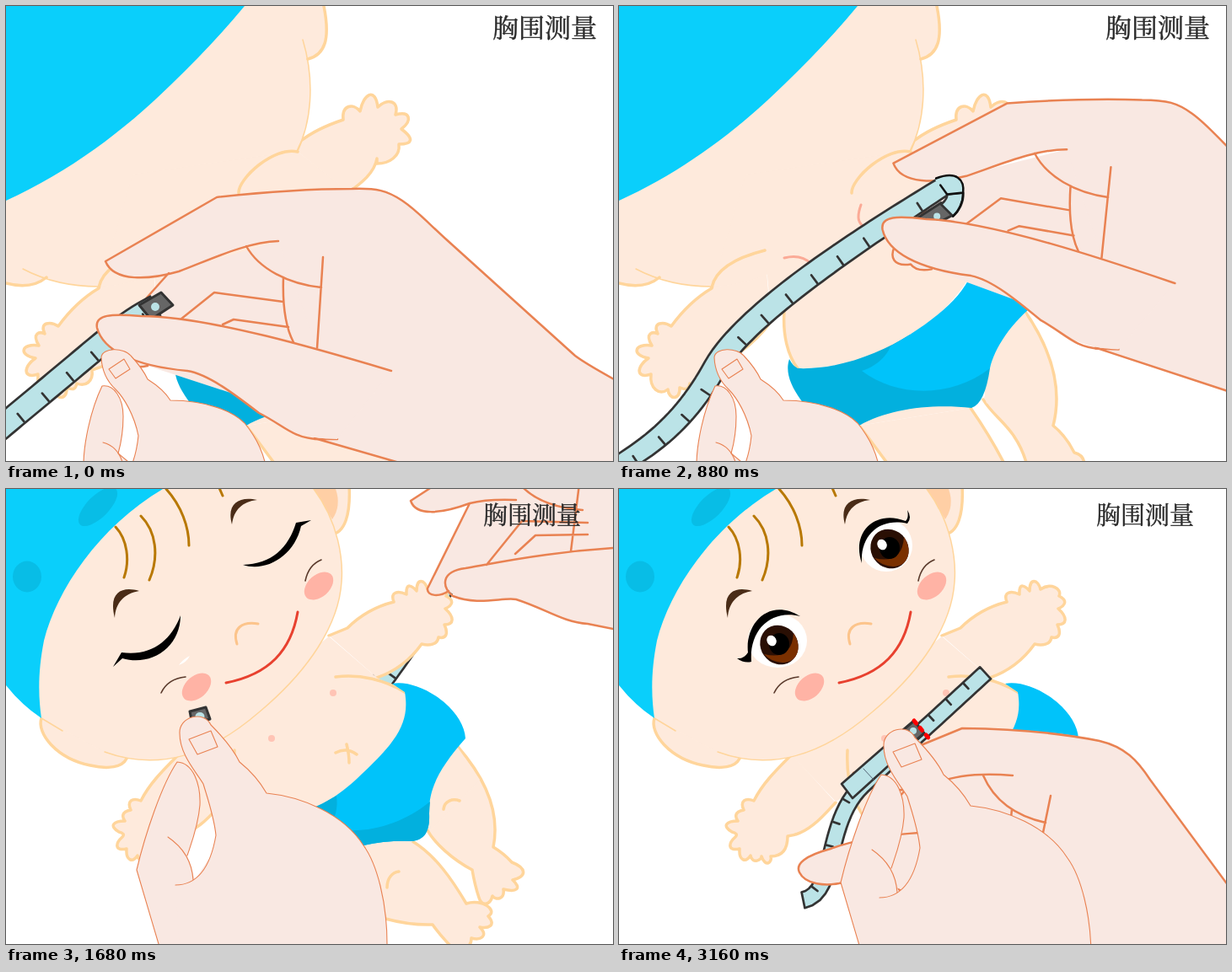
These frames come from a looping animation (720 by 540 pixels, 4920 ms). An HTML page:

```html
<!DOCTYPE html>
<html lang="zh">
<head>
<meta charset="utf-8">
<style>
html, body { margin: 0; width: 100%; height: 100%; overflow: hidden; background: #fff; }
svg { display: block; width: 720px; height: 540px; }
path, ellipse { stroke-linecap: round; stroke-linejoin: round; }
.skin { fill: #feeadc; }
.edge { fill: none; stroke: #ffd59b; stroke-width: 3.5; }
.limb { fill: #feeadc; stroke: #ffd59b; stroke-width: 3.5; }
.thin { stroke-width: 1.5; }
.palm { fill: #f9e8e2; }
.line { fill: none; stroke: #e98252; stroke-width: 2.5; }
.left { fill: #f9e8e2; stroke: #e98252; stroke-width: 1.1; }
.left .n { fill: none; }
.cap { fill: #0acffb; }
.dark { fill: #02b0de; }
.pants { fill: #00c3fa; }
.strip, .tape path { fill: #bbe3e7; stroke: #333; stroke-width: 2.7; }
.tape path.rail { fill: none; stroke: none; }
.block { fill: #666; stroke: #333; stroke-width: 3; }
text { font-family: "Noto Serif CJK SC", "Noto Sans CJK SC", serif; fill: #2b2b2b; stroke: #2b2b2b; stroke-width: .4; }
</style>
</head>
<body>
<svg viewBox="0 0 720 540">
<g id="back">
  <path class="limb" d="M180 375C160 402 130 424 102 432C104 446 94 452 84 448C82 458 76 454 72 453C73 468 59 468 58 455C48 463 36 454 38 437C20 443 20 428 35 418C14 414 18 400 39 403C30 388 40 386 46 389C39 375 53 374 62 380C78 358 93 345 110 335C115 310 145 297 173 290"/>
  <path class="limb" d="M345 172L350 160C365 148 385 140 400 135C398 117 412 115 420 125C424 104 438 96 441 120C452 109 467 112 462 129C480 124 482 136 469 146C485 158 482 164 466 164C468 178 455 187 440 187L440 181C437 198 422 210 405 222"/>
  <path class="limb" d="M285 498L320 545H458Q440 510 417 477"/>
  <path class="limb" d="M432 467C445 490 472 500 484 545H552Q552 533 540 530Q530 510 515 498C526 455 515 410 480 360"/>
  <path class="skin" d="M285 498L417 477L380 440H300ZM480 360L492 390L436 472L420 380Z"/>
  <path class="skin" d="M0 0H377C385 40 378 58 358 63C366 110 358 145 345 172C300 250 200 330 110 333Q60 330 48 322Q30 336 0 330Z"/>
  <path class="skin" d="M110 335Q120 300 173 290L181 373L196 362C194 390 200 415 212 430C350 430 420 330 430 290L405 220L345 172L150 200Z"/>
  <path class="edge" d="M377 0C385 40 378 58 358 63M0 329Q30 337 48 322M276 222C275 205 318 166 346 173M110 334C115 310 145 297 173 290M196 362C194 390 200 415 212 430"/>
  <path class="edge thin" d="M352 40C367 90 362 140 345 172M20 312Q60 333 110 333"/>
  <path class="cap" d="M0 0H283Q245 46 195 94C140 148 75 197 0 231Z"/>
  <path d="M196 299Q216 294 228 306M287 236C282 250 283 258 292 263" fill="none" stroke="#fbaa96" stroke-width="3"/>
  <path class="dark" d="M202 419Q206 427 212 430C260 432 310 412 345 390L440 430Q434 472 418 477C370 472 320 478 285 498C250 478 222 478 216 468C203 450 197 434 202 419Z"/>
  <path class="pants" d="M322 404C318 415 305 428 288 433C330 465 395 465 440 430C445 407 465 375 496 352C495 330 485 312 468 298L425 293C420 330 395 358 345 390Z"/>
  <g id="palm1">
    <path class="palm" d="M193 317L168 345L123 402C118 414 122 426 143 422Q150 431 168 427L300 470L400 410L323 279Z"/>
    <path class="palm" d="M118 303L250 227Q340 217 440 217C472 222 495 253 520 275L675 415Q700 434 830 500V720L634 606Q590 585 574 573L366 513L290 470L369 406L323 279C285 280 240 302 205 315C170 325 130 327 118 303Z"/>
    <path class="line" d="M323 279C285 280 240 302 205 315C170 325 128 328 118 303L250 227Q340 217 410 217C440 216 452 219 470 231C488 243 500 257 520 275L675 415Q700 434 830 500M285 285C300 312 335 330 374 334M376 298L369 406M329 322C328 350 331 380 341 399M193 317L168 345L123 402C118 414 122 426 143 422Q150 431 168 427M207 372L247 340L329 351M257 378L270 372L335 381M366 514H393M366 513L574 573Q590 585 634 606"/>
  </g>
  <g id="tape1" class="tape"></g>
  <g id="tip1">
    <path class="block" d="M158 355L184 340L198 355L172 372Z"/>
    <ellipse cx="177" cy="357" rx="5" ry="5" fill="#bbe3e7"/>
  </g>
  <g id="fold1">
    <path class="block" d="M416 234L444 216L459 230L440 240Z"/>
    <ellipse cx="439" cy="232" rx="4" ry="4" fill="#bbe3e7"/>
    <path class="strip" d="M470 204C471 215 465 226 458 232L444 218Q452 211 451 206Z"/>
    <path fill="#bbe3e7" d="M437 189L441 186C462 177 472 190 470 204L448 206Z"/>
    <path d="M438 187C462 178 472 188 470 205C470 215 465 226 458 232M470 204L451 206L443 195" fill="none" stroke="#111" stroke-width="2.5"/>
  </g>
  <g id="finger1">
    <path class="palm" d="M457 433C380 408 240 368 160 368C125 365 105 366 108 382C115 408 150 427 215 433C240 437 270 460 300 483C330 498 340 513 393 514Z"/>
    <path class="line" d="M457 433C380 410 240 368 160 368C125 365 105 366 108 382C115 408 150 427 215 433C240 437 270 460 300 483C330 498 340 513 370 514"/>
  </g>
  <g class="left">
    <path d="M92 545C92 520 100 480 114 451C128 449 139 465 139 487Q139 510 133 531L150 545Z"/>
    <path d="M113 417C114 405 140 405 148 415Q162 430 168 443Q187 455 195 468C240 468 270 482 283 495Q302 518 308 545H149Q155 530 157 510C152 485 140 465 130 455Q114 440 113 417Z"/>
    <path class="n" d="M122 431L140 419L147 431L130 442ZM115 518Q134 523 139 545"/>
  </g>
  <text x="577" y="37" font-size="31">胸围测量</text>
</g>

<g id="front">
  <g id="tapeA" class="tape"></g>
  <path class="limb" d="M383 174L405 165C422 148 440 139 460 134C455 121 466 121 475 125C474 110 482 115 487 121C487 105 497 107 500 119C512 111 526 118 522 127C532 132 530 138 521 142C532 152 532 161 520 161C525 172 522 178 513 176C512 185 502 186 493 184C478 205 460 217 440 224"/>
  <path class="limb" d="M205 315C185 335 170 350 160 370C150 366 143 370 148 381C136 383 138 390 141 394C127 394 122 400 134 407Q142 409 138 413C130 420 128 430 143 427C142 441 150 444 156 435C158 446 170 440 169 436C174 450 182 443 180 436C196 436 200 425 200 412C225 410 245 385 257 372"/>
  <path class="limb" d="M536 306C570 345 586 385 578 425Q590 432 600 443C618 450 618 460 601 464C612 474 606 479 590 475C592 488 580 488 577 483C574 495 564 495 561 485Q556 470 553 452C530 440 508 420 500 405"/>
  <path class="limb" d="M482 418C510 435 530 465 546 492C565 486 584 500 572 507C582 518 572 522 562 520C572 530 564 536 552 533Q552 545 540 545H530Q515 530 506 517Q480 518 450 510L424 423"/>
  <path class="skin" d="M536 307L562 345L503 406L480 320ZM424 424L482 419L470 395L400 400Z"/>
  <path class="skin" d="M206 317L257 371L273 362Q285 390 330 400H390L480 280L473 241L440 224L383 175Z"/>
  <path class="edge" d="M391 223C420 219 450 227 473 241M271 310C269 350 280 380 300 400M519 380C520 370 530 367 538 370M452 473C452 462 458 455 466 454M404 303Q407 315 407 325M391 313Q404 306 416 315"/>
  <path class="pants" d="M458 231C490 225 543 260 545 296C515 330 501 355 502 385C503 408 495 416 482 418Q450 417 424 423C390 430 365 440 345 457Q325 440 330 391C360 385 390 368 415 345C460 303 480 280 473 241Z"/>
  <path class="dark" d="M503 371C470 398 425 412 383 402Q395 385 392 364Q360 383 330 391Q325 440 345 457C365 440 390 425 424 423Q450 417 482 418C496 416 503 408 502 385Z"/>
  <g fill="#ffc4b5"><ellipse cx="388" cy="242" rx="4" ry="4"/><ellipse cx="315" cy="296" rx="4" ry="4"/></g>
  <path class="limb" d="M407 -5C409 30 402 53 385 54L350 0Z"/>
  <path d="M365 0H391Q398 20 387 36Z" fill="#ffcfa5"/>
  <path class="limb" d="M42 272C36 290 60 320 100 328C122 333 138 330 143 320L150 270Z"/>
  <path class="skin" d="M186 0H365C395 40 400 85 398 110C395 160 360 215 300 265C240 317 180 335 117 312L42 272L20 200L80 0Z"/>
  <path class="edge thin" d="M365 0C395 40 400 85 398 110C395 160 360 215 300 265C240 317 180 335 117 312M42 272L67 287"/>
  <path class="cap" d="M0 0H186C110 45 60 120 45 180C38 215 38 245 42 272Q18 256 0 233Z"/>
  <g fill="#08bde6">
    <ellipse cx="25" cy="104" rx="17" ry="18.5"/>
    <ellipse cx="109" cy="21" rx="30" ry="13" transform="rotate(-45 109 21)"/>
  </g>
  <path d="M130 45C144 60 147 85 140 105M160 32C178 50 182 80 170 108M190 0C208 20 217 45 217 67M250 -8L257 8" fill="none" stroke="#b87800" stroke-width="3"/>
  <path d="M129 153C121 122 138 115 158 121C140 124 130 135 129 153ZM268 42C261 17 277 8 298 13C280 15 270 25 268 42Z" fill="#4a2c17"/>
  <path d="M274 184C268 165 280 157 299 160" fill="none" stroke="#fcc48b" stroke-width="3"/>
  <path d="M261 230C312 220 338 192 346 146" fill="none" stroke="#e8412f" stroke-width="3"/>
  <g fill="#ffb3a5">
    <ellipse cx="226" cy="235" rx="20" ry="13" transform="rotate(-42 226 235)"/>
    <ellipse cx="371" cy="115" rx="20" ry="13" transform="rotate(-42 371 115)"/>
  </g>
  <path d="M184 242Q192 225 213 223M355 109Q359 90 374 84" fill="none" stroke="#5a3a2c" stroke-width="1.6"/>
  <g id="open">
    <ellipse cx="188" cy="180" rx="35" ry="32" fill="#fff"/>
    <ellipse cx="317" cy="67" rx="31" ry="31" fill="#fff"/>
    <path d="M140 201Q148 202 153 194C149 160 178 128 215 151C180 142 154 168 157 205Q148 207 140 201ZM288 88C275 50 305 24 340 38Q344 34 342 25Q348 34 342 41C312 34 286 52 288 88Z"/>
    <g id="iris">
      <ellipse cx="190" cy="185" rx="22" ry="24" fill="#2a0f04" transform="rotate(-35 190 185)"/>
      <path d="M207 171C217 185 214 206 194 206Q180 205 172 196Q205 204 207 171Z" fill="#7a3000"/>
      <ellipse cx="190" cy="184" rx="12" ry="13"/>
      <ellipse cx="181" cy="180" rx="5.5" ry="6.5" fill="#fff" transform="rotate(-30 181 180)"/>
    </g>
    <use href="#iris" x="131" y="-114"/>
  </g>
  <g id="closed">
    <path d="M127 211L137 194C172 199 196 180 207 150C207 188 172 211 138 201ZM281 90C315 89 335 70 344 40L362 37L350 44C342 80 308 99 281 90Z"/>
    <path d="M205 209Q214 206 218 198Q210 202 205 209Z" fill="#fff"/>
  </g>
  <g id="handA">
    <path class="palm" d="M640 -90L480 14C486 32 515 30 550 17L500 118C499 128 515 128 525 121Q540 134 565 134C590 129 605 128 620 136C650 150 670 159 690 160L760 174V-90Z"/>
    <path class="line" d="M640 -90L480 14C486 32 515 30 550 17C565 13 580 12 605 13M550 17L500 118C499 128 515 128 525 121M570 90L612 38L690 40M604 77L628 55L690 54M683 -30L670 74M600 -20Q620 20 684 25M760 68C650 72 580 88 545 94C515 98 517 116 530 127C560 139 590 128 605 131C640 142 660 158 690 160L760 174"/>
  </g>
  <g id="palmB">
    <path class="palm" d="M490 207L415 290C413 303 435 303 445 299L485 300L530 279L510 298L560 380L586 386L1000 590V490L870 317L780 195Q750 155 720 148Q650 134 557 134L428 187C430 205 455 212 490 207Z"/>
    <path class="line" d="M617 190C580 187 550 190 530 198C490 212 432 212 428 187L557 134Q650 135 720 149C750 156 765 172 780 195L870 317L1000 490M582 190C595 220 620 238 656 246M662 214L640 321M616 230Q612 260 617 295M490 207L415 290C413 303 435 303 445 297L540 235L613 255M488 300L557 267L615 283M586 386L720 450L1000 590"/>
  </g>
  <g id="tapeB" class="tape"></g>
  <g id="fingerB">
    <path class="palm" d="M638 295C560 295 480 298 430 317C400 325 388 335 393 345C400 360 425 361 440 358C465 352 490 355 510 365C540 380 570 392 607 379L660 330Z"/>
    <path class="line" d="M638 295C560 295 480 298 430 317C400 325 388 335 393 345C400 360 425 361 440 358C465 352 490 355 510 365C540 380 570 392 607 379"/>
  </g>
  <g id="strip">
    <path class="strip" d="M264 350L277 367L362 290L350 275Z"/>
    <path class="block" d="M337 286L350 275L362 290L349 301Z"/>
    <ellipse cx="349" cy="287" rx="4" ry="4" fill="#bbe3e7"/>
    <path d="M290 332L302 345" stroke="#567" stroke-width="1"/>
  </g>
  <path id="mark" d="M350 275L370 299" stroke="#f00" stroke-width="5" stroke-dasharray="4 7"/>
  <g id="hold" class="left">
    <g id="peek">
      <path class="block" d="M218 264L237 259L242 273L221 279Z"/>
      <ellipse cx="230" cy="270" rx="5.5" ry="5" fill="#bbe3e7" stroke="none"/>
    </g>
    <path stroke="none" d="M181 540L155 452C165 410 185 350 203 324C222 325 231 350 230 375C228 400 220 420 215 435L224 464L240 440L300 430V640H212Z"/>
    <path stroke="none" d="M206 290C205 270 235 262 243 280Q268 305 277 324Q297 340 309 361C350 365 400 385 424 423C440 445 452 490 452 540V640H212L201 470C232 470 244 440 249 411C247 390 240 370 234 350C225 335 206 315 206 290Z"/>
    <path class="n" d="M212 640L181 540L155 452C165 410 185 350 203 324C222 325 231 350 230 375C228 400 220 420 215 435M201 470C232 470 244 440 249 411C247 390 240 370 234 350C225 335 206 315 206 290C205 270 235 262 243 280Q268 305 277 324Q297 340 309 361C350 365 400 385 424 423C440 445 452 490 452 540V640M217 297L243 287L251 306L227 315ZM192 413Q220 432 222 464"/>
  </g>
  <text x="566" y="42" font-size="29">胸围测量</text>
</g>
</svg>
<script>
const LOOP = 4920, CUT = 1440;
const $ = id => document.getElementById(id);
const show = (on, ...ids) => ids.forEach(id => $(id).style.display = on ? '' : 'none');
const clamp = (v, lo = 0, hi = 1) => Math.min(hi, Math.max(lo, v));
const ramp = (t, from, to) => clamp((t - from) / (to - from));
const blend = (a, b, k) => a.map((v, i) => v + (b[i] - v) * k);

// Poses are evenly numbered: k = 1.5 lies halfway between the second and third
function between(poses, k) {
  const i = Math.min(Math.floor(k), poses.length - 2);
  return blend(poses[i], poses[i + 1], k - i);
}

function place(id, [x, y, turn = 0], cx = 0, cy = 0) {
  $(id).setAttribute('transform', `translate(${x} ${y}) rotate(${turn} ${cx} ${cy})`);
}

// A band of given width along a curve, with ruler ticks from its middle to one side
function makeTape(id, width, gap, side) {
  const g = $(id);
  g.innerHTML = '<path class="rail"/><path/><path/>';
  const [rail, band, ticks] = g.children;
  return (d, start = gap, taper = 0) => {
    rail.setAttribute('d', d);
    const len = rail.getTotalLength();
    const at = (s, offset) => {
      const a = rail.getPointAtLength(Math.max(0, s - 1));
      const b = rail.getPointAtLength(Math.min(len, s + 1));
      const u = 2 * s / len - 1;
      const r = offset * width / 2 * (1 - taper * u * u) / (Math.hypot(b.x - a.x, b.y - a.y) || 1);
      return `${(a.x + b.x) / 2 + (b.y - a.y) * r} ${(a.y + b.y) / 2 + (a.x - b.x) * r}`;
    };
    const one = [], other = [];
    const n = Math.ceil(len / 8);
    for (let i = 0; i <= n; i++) {
      one.push(at(len * i / n, 1));
      other.unshift(at(len * i / n, -1));
    }
    band.setAttribute('d', `M${one.concat(other).join('L')}Z`);
    let marks = '';
    for (let s = start; s < len - 8; s += gap) marks += `M${at(s, 0)}L${at(s, side * .85)}`;
    ticks.setAttribute('d', marks || 'M0 0');
  };
}

const tape1 = makeTape('tape1', 28, 38, 1);
const tapeA = makeTape('tapeA', 24, 30, 1);
const tapeB = makeTape('tapeB', 19, 28, -1);

// Hand: shift and turn at the start, halfway through each pull and at its end
const PULL = [[0, 0, 0], [138, -91, .5], [272, -129, 3.5]];
// Tape below the head: control, grip, control, tail
const HANG = [
  [145, 374, 101, 411, -20, 512, -80, 562],
  [150, 381, 100, 423, 10, 520, 2, 590],
  [150, 350, 125, 435, 60, 525, -15, 514]
];
const WRAP = [
  [451, 228, 562, 92, 508, 235, 405, 365, 350, 400, 322, 470],
  [435, 218, 387, 262, 338, 307, 290, 351, 260, 480, 218, 488]
];

function drawBack(t) {
  const k = ramp(t, 0, 600) + ramp(t, 600, 1120);
  const folded = t >= 860;
  const hand = between(PULL, k);
  // The first pull runs a little ahead of an even pace
  const lead = Math.sin(Math.PI * clamp(k));
  hand[0] += 11 * lead;
  hand[1] -= 13 * lead;
  for (const id of ['palm1', 'finger1', 'tip1']) place(id, hand, 250, 227);
  const end = PULL[2];
  const [fx, fy] = [hand[0] - end[0], hand[1] - end[1]];
  place('fold1', [fx, fy]);
  show(!folded, 'tip1');
  show(folded, 'fold1');

  const a = hand[2] * Math.PI / 180, [rx, ry] = [-72, 130];
  const [hx, hy] = folded ? [446 + fx, 197 + fy] : [
    250 + hand[0] + rx * Math.cos(a) - ry * Math.sin(a),
    227 + hand[1] + rx * Math.sin(a) + ry * Math.cos(a)
  ];
  const [cx, cy, gx, gy, sx, sy, ex, ey] = between(HANG, k);
  const c1 = blend([hx, hy], [cx, cy], .4);
  tape1(`M${hx} ${hy}C${c1} ${cx} ${cy} ${gx} ${gy}S${sx} ${sy} ${ex} ${ey}`, folded ? 36 : 18, .35 * clamp(k - 1));
}

function drawFront(t) {
  const over = t >= 2120, shut = !over || (t >= 2960 && t < 3160);
  show(!shut, 'open');
  show(shut, 'closed');
  show(!over, 'handA', 'tapeA', 'peek');
  show(over, 'palmB', 'tapeB', 'fingerB', 'strip');
  show(t >= 2680, 'mark');

  const step = Math.floor(t / 80) * 80;
  const s = clamp((step - 1680) / 240, -.5);
  place('hold', [108 * s, 15 * s]);
  if (over) {
    const k = ramp(step, 2160, 2560);
    place('palmB', [-150 * k, 150 * k]);
    place('fingerB', [-179 * k, 110 * k]);
    const p = between(WRAP, k);
    tapeB(`M${p.slice(0, 2)}C${p.slice(2, 8)}S${p.slice(8)}`);
  } else {
    place('handA', [8 * s, -30 * s]);
    tapeA(`M${528 + 8 * s} ${100 - 30 * s}Q495 165 420 262`, 20);
  }
}

function frame() {
  const t = Math.floor(performance.now() % LOOP / 40) * 40;
  const first = t < CUT;
  show(first, 'back');
  show(!first, 'front');
  first ? drawBack(t) : drawFront(t);
  requestAnimationFrame(frame);
}
frame();
</script>
</body>
</html>
```
